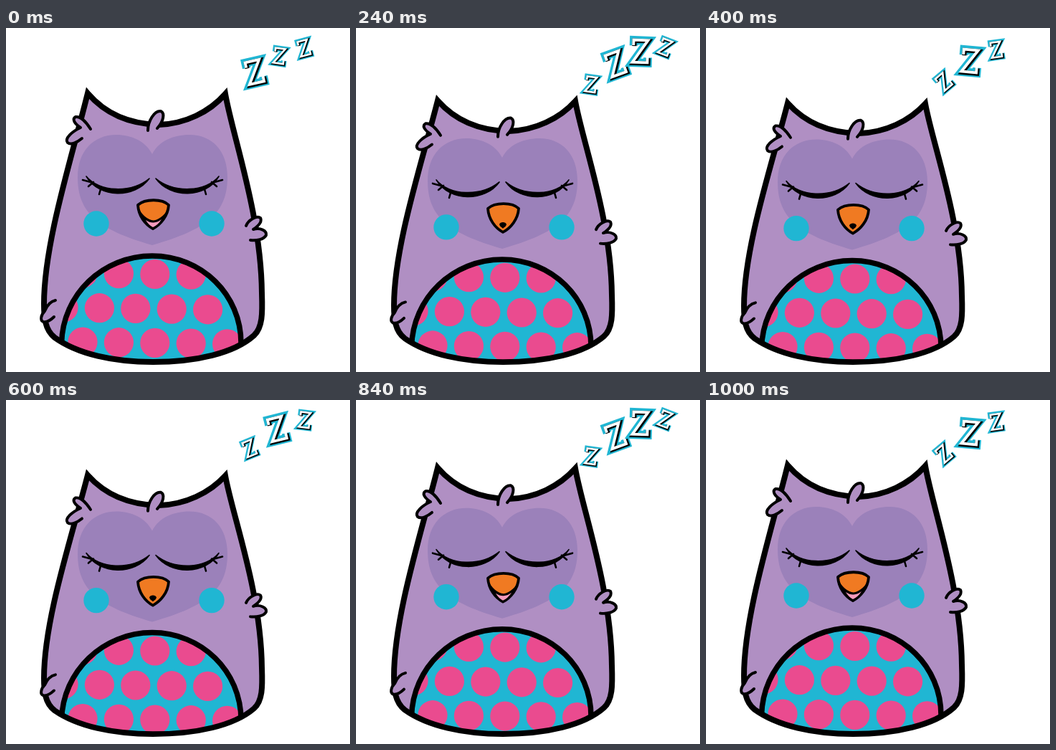
Recreate the animation shown at these times as an HTML page. Size 480 by 480 pixels, loop 1200 ms.

```html
<!DOCTYPE html>
<html lang="en">
<head>
<meta charset="utf-8">
<title>Sleeping owl</title>
<style>
  html, body { margin: 0; width: 100%; height: 100%; overflow: hidden; background: #fff; }
  svg { display: block; width: 100vw; height: 100vh; }
  .line { fill: none; stroke: #000; stroke-linecap: round; }
  .tuft { fill: #b08fc3; stroke: #000; stroke-width: 4; stroke-linecap: round; stroke-linejoin: round; }
</style>
</head>
<body>
<svg viewBox="0 0 480 480">
  <defs>
    <path id="body" d="M114 91 C138 119 172 134 213 135 C250 134 284 117 306 92
      C316 150 356 260 357 370 C358 398 358 418 346 429 C318 454 265 466 205 466
      C150 466 100 455 68 432 C54 421 53 403 53 385 C53 300 92 180 114 91 Z"/>
    <path id="belly" d="M77.500 490 V440 C79 372 135 318 204 318 C273 318 328 372 328 440 V490 Z"/>
    <clipPath id="inBody"><use class="squash" href="#body"/></clipPath>
    <clipPath id="inBelly"><use href="#belly"/></clipPath>
    <g id="eye">
      <path d="M112 207 C130 229 174 231 200 210 C180 238 130 238 112 207 Z" stroke="#000" stroke-width="1.6" stroke-linejoin="round"/>
      <path class="line" stroke-width="2.6" d="M107 212 L118 215 M115 221 L122 215 M130 232 L132 225"/>
    </g>
  </defs>

  <use class="squash" href="#body" fill="#b08fc3"/>
  <path class="slide" fill="#9b81ba" d="M204 176 C195 158 175 149 154 149 C122 149 100 172 100 208
    C100 258 128 281 204 303 C281 281 309 258 309 208 C309 172 288 149 256 149
    C233 149 213 158 204 176 Z"/>
  <g clip-path="url(#inBody)">
    <g class="slide">
      <use href="#belly" fill="#20b6d3"/>
      <g id="dots" fill="#ea4b8f" clip-path="url(#inBelly)"></g>
      <use href="#belly" class="line" stroke-width="7.500"/>
    </g>
  </g>
  <g class="squash">
    <use href="#body" class="line" stroke-width="8"/>
    <path class="tuft" d="M118 141 C112 131 104 123 97 124 C92 127 95 133 104 139
      C93 144 81 154 86 160 C91 164 100 159 106 154"/>
    <path class="tuft" d="M198 143 C198 130 207 115 216 116 C222 119 220 130 211 140"/>
    <path class="tuft" d="M335 276 C338 268 350 261 355 265 C358 271 351 277 345 281
      C355 278 364 283 363 289 C360 295 350 297 341 296"/>
    <path class="tuft" d="M69 380 C60 382 56 390 54 395 C49 400 47 408 52 410 C58 411 63 407 67 403"/>
  </g>
  <g class="slide">
    <g fill="#20b6d3">
      <circle cx="126" cy="273" r="17.700"/>
      <circle cx="287" cy="273" r="17.700"/>
    </g>
    <use href="#eye"/>
    <use href="#eye" transform="translate(409 0) scale(-1 1)"/>
    <path fill="#f07a22" stroke="#000" stroke-width="3.800" stroke-linejoin="round"
      d="M184 247 C194 238 218 238 227 247 C226 262 216 274 205 280 C194 274 185 262 184 247 Z"/>
    <path id="shut" d="M200 269 C201 265 209 265 210 269 C209 273 206 273 205 275 C204 273 201 273 200 269 Z"/>
    <g id="open">
      <path d="M185 250 C188 260 198 268 206 268.500 C215 267 224 259 226 250 C225 263 216 274 205 280 C194 274 187 263 185 250 Z"/>
      <path fill="#f59bbd" d="M195 268 Q201 272 206 271.500 Q212 271 217 267 Q212 275 205 278 Q199 275 195 268 Z"/>
    </g>
  </g>
  <g id="snore"></g>
</svg>
<script>
const LOOP = 1200, FLOOR = 471;
const $ = id => document.getElementById(id);
const setAll = (cls, transform) =>
  document.querySelectorAll('.' + cls).forEach(el => el.setAttribute('transform', transform));

function add(parent, tag, attrs) {
  const el = document.createElementNS('http://www.w3.org/2000/svg', tag);
  for (const k in attrs) el.setAttribute(k, attrs[k]);
  parent.appendChild(el);
  return el;
}

// Belly dots: staggered rows that drop slightly to the right
for (let row = 0; row < 3; row++)
  for (let col = 0; col < 5; col++)
    add($('dots'), 'circle', {
      cx: 107 - 27 * (row % 2) + 50.4 * col,
      cy: 342 + 48 * row + 0.7 * col,
      r: 20.6
    });

// One Z: a cyan rim, a black edge and a white face
function addZ(parent, x, y, height, tilt) {
  const z = add(parent, 'g', { transform: `translate(${x} ${y}) rotate(${tilt}) scale(${height / 29})` });
  const layer = (stroke, width, shift) => add(z, 'path', {
    d: 'M-6.5 -5.5 V-10.5 H7 L-7 10.5 H7 V5.5',
    stroke, 'stroke-width': width, transform: `translate(${shift} ${shift})`
  });
  layer('#20b6d3', 8, 0);
  layer('#000', 4.2, 0.5);
  layer('#fff', 2.6, -0.3);
}

// Letters are evenly spaced along one arc; those listed in big are larger
function addSnore(start, step, big, tilts) {
  const group = add($('snore'), 'g', { fill: 'none' });
  tilts.forEach((tilt, i) => {
    const x = start + step * i;
    const y = 27 + 52 * ((432 - x) / 104) ** 2;
    addZ(group, x, y, big.includes(i) ? 43 : 29, tilt);
  });
  return group;
}

const three = addSnore(347, 34.5, [0], [-13, 8, -15]);
const four = addSnore(328, 34.5, [1, 2], [8, -20, 2, 21]);
const fan = addSnore(332, 36.5, [1], [-40, 5, -8]);
const lean = addSnore(340, 38.5, [1], [-22, -14, 7]);
const order = [three, four, fan, lean, four, fan];

const easeInOut = p => p < 0.5 ? 4 * p ** 3 : 1 - 4 * (1 - p) ** 3;

function draw(t) {
  // Breathe out for half the loop, then in, in steps of 80 ms
  const p = easeInOut(Math.min(5, Math.floor(t % 600 / 80)) / 5);
  const sunk = t < 600 ? p : 1 - p;
  const scale = 1 - 0.036 * sunk;
  setAll('squash', `translate(0 ${FLOOR * (1 - scale)}) scale(1 ${scale})`);
  setAll('slide', `translate(0 ${6.6 * sunk})`);

  const closed = t >= 80 && t < 680;
  $('shut').style.display = closed ? '' : 'none';
  $('open').style.display = closed ? 'none' : '';

  const current = order[Math.floor(t / 200)];
  for (const group of order) group.style.display = group === current ? '' : 'none';
}

function tick() {
  draw(performance.now() % LOOP);
  requestAnimationFrame(tick);
}
tick();
</script>
</body>
</html>
```
